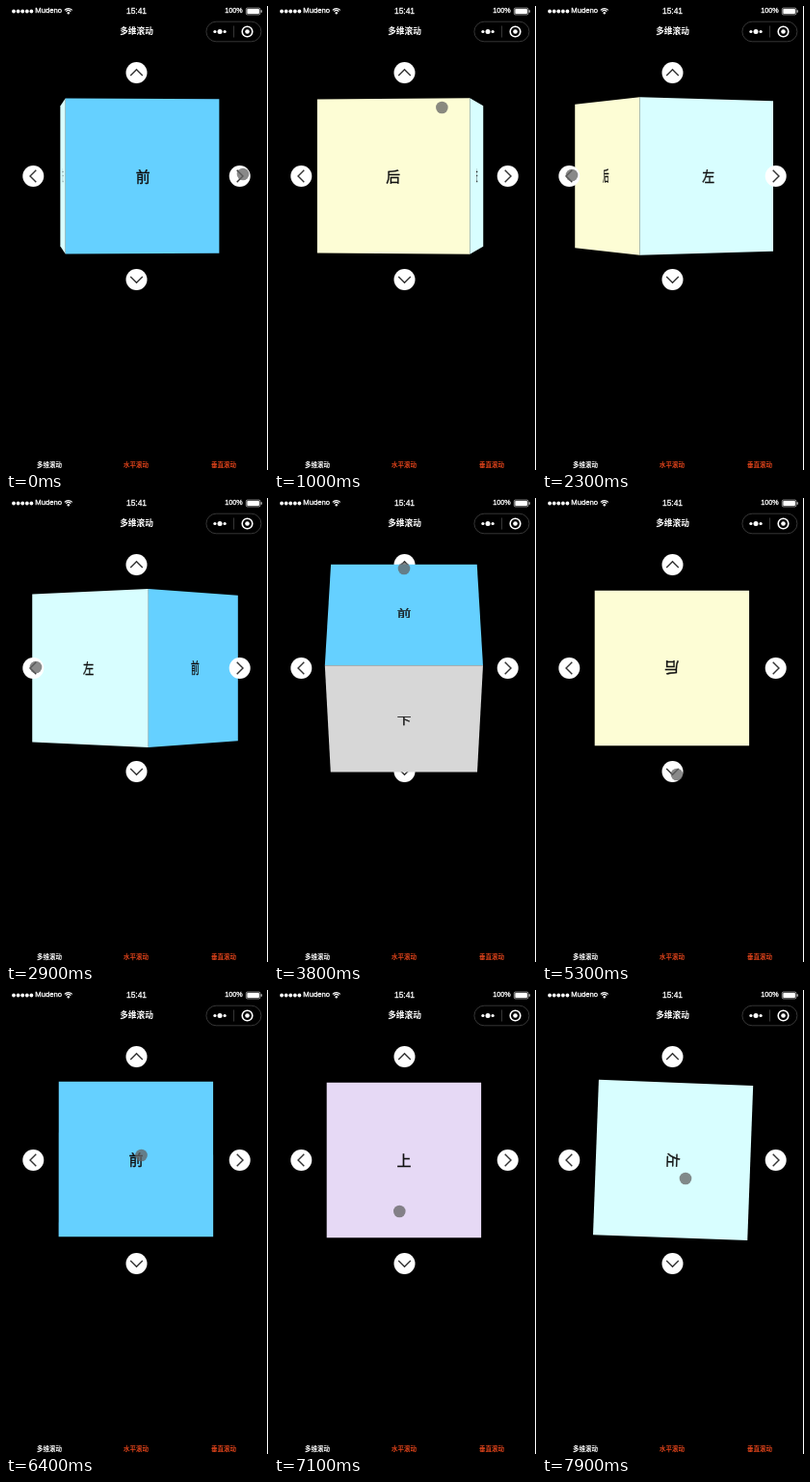
An HTML page with a canvas that plays this animation: 272x480 px, repeating every 8000 ms.

```html
<!DOCTYPE html>
<html lang="zh">
<head>
<meta charset="utf-8">
<title>多维滚动</title>
<style>
html, body { margin: 0; width: 100%; height: 100%; overflow: hidden; background: #000; }
#stage { position: absolute; left: 0; top: 0; width: 272px; height: 480px; overflow: hidden; background: #000; }
canvas { position: absolute; left: 0; top: 0; width: 272px; height: 480px; }
span {
  position: absolute; transform: translate(-50%, -50%);
  color: #fff; line-height: 1; white-space: nowrap;
  font-family: "Noto Sans CJK SC", "Noto Sans CJK", sans-serif;
}
.bar { font-family: "Liberation Sans", Arial, sans-serif; top: 5px; -webkit-text-stroke: 0.3px #fff; }
.title { font-size: 8.7px; font-weight: 700; left: 135.5px; top: 26px; }
.tab { font-size: 6.5px; font-weight: 700; top: 474.3px; }
.off { color: #dc421a; }
</style>
</head>
<body>
<div id="stage">
  <canvas id="view"></canvas>
  <span class="bar" style="left:44.2px;font-size:7.7px">Mudeno</span>
  <span class="bar" style="left:135.5px;font-size:8.4px">15:41</span>
  <span class="bar" style="left:236.5px;font-size:7.2px">100%</span>
  <span class="title">多维滚动</span>
  <span class="tab" style="left:45px">多维滚动</span>
  <span class="tab off" style="left:135px">水平滚动</span>
  <span class="tab off" style="left:226px">垂直滚动</span>
</div>
<script>
const W = 272, H = 480, LOOP = 8000, STEP = 100;
const HALF = 80.2, DEPTH = 1440, CX = 134.9, CY = 176;
const QUARTER = Math.PI / 2, TURN_MS = 600;
const view = document.getElementById('view');
const ctx = view.getContext('2d');
const scale = Math.max(1, window.devicePixelRatio || 1);
view.width = W * scale;
view.height = H * scale;

// Pitch and yaw are the quarter turns that carry the front face into place
const faces = [
  { label: '前', color: '#65d0ff', pitch: 0, yaw: 0 },
  { label: '后', color: '#fdfdd5', pitch: 0, yaw: 2 },
  { label: '左', color: '#d8feff', pitch: 0, yaw: -1 },
  { label: '右', color: '#ffe0cc', pitch: 0, yaw: 1 },
  { label: '上', color: '#e6d9f5', pitch: 1, yaw: 0 },
  { label: '下', color: '#d7d7d7', pitch: -1, yaw: 0 }
];

// Two taps on each arrow, every tap a quarter turn
const taps = [
  { axis: 'yaw', dir: 1, at: -91, gap: 608 },
  { axis: 'yaw', dir: -1, at: 1927, gap: 700 },
  { axis: 'pitch', dir: 1, at: 3494, gap: 906 },
  { axis: 'pitch', dir: -1, at: 5310, gap: 524 }
];
const dragDown = { at: 6470, len: 560, x: 143, y: 238 };
const dragRight = { at: 7270, len: 600, x: 149, y: 195 };

// The pointer rests between hops
const home = { x: 246, y: 174 };
const hops = [
  { at: 620, len: 970, x: 31, y: 175, bow: 80 },
  { at: 3150, len: 300, x: 135, y: 73 },
  { at: 4700, len: 520, x: 140, y: 286 },
  { at: 5950, len: 430, x: 140.5, y: 171 },
  dragDown,
  { at: 7030, len: 240, x: 78, y: 192 },
  dragRight
];

function ramp(t, { at, len }) {
  const u = Math.min(1, Math.max(0, (t - at) / len));
  return (1 - Math.cos(Math.PI * u)) / 2;
}

function pose(t) {
  const p = { pitch: 0, yaw: 0, roll: 0 };
  for (const { axis, dir, at, gap } of taps)
    for (const start of [at, at + gap])
      p[axis] += dir * QUARTER * ramp(t, { at: start, len: TURN_MS });
  p.pitch -= QUARTER * ramp(t, dragDown);
  p.yaw += 1.01 * QUARTER * ramp(t, dragRight);
  p.roll = 0.037 * ramp(t, dragRight);
  return p;
}

function pointer(t) {
  let { x, y } = home;
  for (const hop of hops) {
    const u = ramp(t, hop);
    x += (hop.x - x) * u;
    y += (hop.y - y) * u - (hop.bow || 0) * Math.sin(Math.PI * u);
  }
  return [x, y];
}

function spin(a, b, angle) {
  const s = Math.sin(angle), c = Math.cos(angle);
  return [a * c - b * s, a * s + b * c];
}

function rotate([x, y, z], pitch, yaw, roll = 0) {
  [y, z] = spin(y, z, pitch);
  [z, x] = spin(z, x, yaw);
  [x, y] = spin(x, y, roll);
  return [x, y, z];
}

function project([x, y, z]) {
  const k = DEPTH / (DEPTH + HALF - z);
  return [CX + x * k, CY + y * k];
}

function drawCube(t) {
  const { pitch, yaw, roll } = pose(t);
  for (const face of faces) {
    const at = (u, v) => {
      const p = rotate([u, v, HALF], face.pitch * QUARTER, face.yaw * QUARTER);
      return project(rotate(p, pitch, yaw, roll));
    };
    const quad = [at(-HALF, -HALF), at(HALF, -HALF), at(HALF, HALF), at(-HALF, HALF)];
    const [p, q, , s] = quad;
    const facing = (q[0] - p[0]) * (s[1] - p[1]) - (q[1] - p[1]) * (s[0] - p[0]);
    if (facing <= 1) continue;
    ctx.fillStyle = face.color;
    ctx.beginPath();
    quad.forEach(([x, y]) => ctx.lineTo(x, y));
    ctx.fill();

    const o = at(0, 0), ex = at(1, 0), ey = at(0, 1);
    ctx.save();
    ctx.transform(ex[0] - o[0], ex[1] - o[1], ey[0] - o[0], ey[1] - o[1], ...o);
    ctx.fillStyle = ctx.strokeStyle = '#111';
    ctx.lineWidth = 0.35;
    ctx.font = '15px "Noto Sans CJK SC", "Noto Sans CJK", sans-serif';
    ctx.textAlign = 'center';
    ctx.fillText(face.label, 0.2, 5.6);
    ctx.strokeText(face.label, 0.2, 5.6);
    ctx.restore();
  }
}

function disc(x, y, r, color) {
  ctx.fillStyle = color;
  ctx.beginPath();
  ctx.arc(x, y, r, 0, Math.PI * 2);
  ctx.fill();
}

function ring(x, y, r, width, from = 0, to = Math.PI * 2) {
  ctx.strokeStyle = '#fff';
  ctx.lineWidth = width;
  ctx.beginPath();
  ctx.arc(x, y, r, from, to);
  ctx.stroke();
}

function box(x, y, w, h, r) {
  ctx.beginPath();
  ctx.roundRect(x, y, w, h, r);
}

// Arrows sit around the cube: 0 up, 1 right, 2 down, 3 left
function arrow(side) {
  const a = side * QUARTER;
  ctx.save();
  ctx.translate(135.5 + 107.2 * Math.sin(a), 176 - 107 * Math.cos(a));
  ctx.rotate(a);
  disc(0, 0, 11, '#fff');
  ctx.strokeStyle = '#333';
  ctx.lineWidth = 1.4;
  ctx.beginPath();
  ctx.moveTo(-6.3, 3);
  ctx.lineTo(0, -3.3);
  ctx.lineTo(6.3, 3);
  ctx.stroke();
  ctx.restore();
}

function drawStatus() {
  for (let i = 0; i < 5; i++) disc(8 + i * 4.6, 5.5, 1.9, '#fff');
  for (const r of [3.4, 5.4]) ring(64.8, 8, r, 1.1, -Math.PI * 0.76, -Math.PI * 0.24);
  disc(64.8, 7.3, 1.2, '#fff');

  ctx.lineWidth = 0.6;
  box(249.3, 2.1, 14.6, 6.8, 1.3);
  ctx.stroke();
  ctx.fillStyle = '#fff';
  box(250.3, 3.1, 12.6, 4.8, 0.6);
  ctx.fill();
  ctx.fillRect(264.6, 4.3, 1, 2.4);
  ctx.fillRect(W - 1, 0, 1, H);
}

function drawCapsule() {
  const y = 26.5;
  ctx.strokeStyle = '#444';
  ctx.lineWidth = 0.8;
  box(207.9, y - 10.3, 57, 20.6, 10.3);
  ctx.moveTo(236.5, y - 6);
  ctx.lineTo(236.5, y + 6);
  ctx.stroke();
  for (const i of [-1, 0, 1]) disc(222 + i * 5.1, y, i ? 1.6 : 2.5, '#fff');
  ring(250.5, y, 5.3, 1.6);
  disc(250.5, y, 2.3, '#fff');
}

function draw(t) {
  ctx.setTransform(scale, 0, 0, scale, 0, 0);
  ctx.fillStyle = '#000';
  ctx.fillRect(0, 0, W, H);
  drawStatus();
  drawCapsule();
  [0, 2].forEach(arrow);
  drawCube(t);
  [1, 3].forEach(arrow);
  disc(...pointer(t), 6.3, 'rgba(100,100,100,0.76)');
}

const begin = performance.now();
function tick() {
  const t = (performance.now() - begin) % LOOP;
  draw(Math.floor(t / STEP) * STEP);
  requestAnimationFrame(tick);
}
tick();
</script>
</body>
</html>
```
